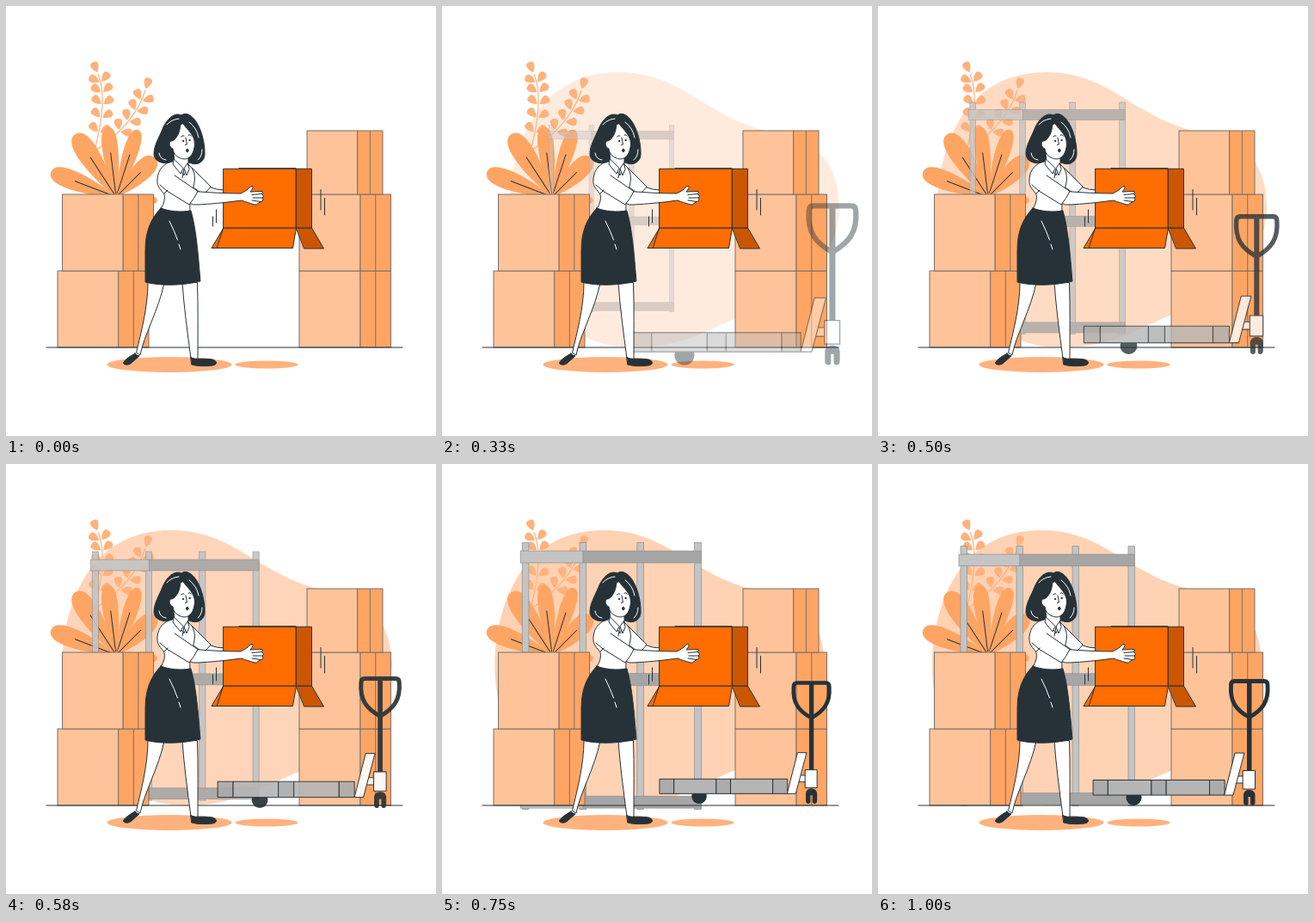
An HTML page for the animation above (1040 ms loop, 500x500 px).

```html
<!DOCTYPE html>
<html lang="en">
<head>
<meta charset="utf-8">
<title>Packing boxes</title>
<style>
  html, body { margin: 0; width: 100%; height: 100%; overflow: hidden; background: #fff; }
  svg { display: block; width: 100vw; height: 100vh; }
  .ink { stroke: #263238; stroke-width: 1; stroke-linecap: round; stroke-linejoin: round; }
  .line { fill: none; }
  .shine { fill: none; stroke: #fff; }
  .white { fill: #fff; }
  .dark { fill: #263238; }
  .carton { stroke: #77706c; stroke-width: 1; }
  .frame { stroke: #8f8f8f; stroke-width: .7; }
</style>
</head>
<body>
<svg viewBox="0 0 500 500">
  <path id="blob" fill="#ffd2b3" d="M63 235C63 180 85 77 190 77C262 77 288 126 360 145C425 152 446 190 446 232C446 300 390 338 340 357C294 375 270 397 205 397C130 397 63 330 63 235Z"/>

  <g id="sprigs" fill="#ffb27d"></g>
  <g id="leaves" fill="#ffa564"></g>
  <g id="shelf" class="frame"></g>
  <g id="cartons" class="carton"></g>

  <path class="ink" d="M47 397H461"/>
  <g fill="#ffb27d">
    <ellipse cx="190" cy="417" rx="72.5" ry="9"/>
    <ellipse cx="303" cy="417" rx="36.5" ry="4.5"/>
  </g>

  <g id="jack">
    <circle class="dark" cx="297.5" cy="388" r="9"/>
    <g id="deck" class="ink"></g>
    <path class="ink white" d="M416 363H426V371H413Z"/>
    <path class="ink white" d="M403 385H413L426 336H415.5Z"/>
    <path class="dark" d="M429 252H434.500V358H429Z"/>
    <path fill="none" stroke="#263238" stroke-width="4.8" d="M414.500 252.500H449Q453 252.500 453 257C454.500 276 447 286 431.700 294.500C416 286 409 276 410.500 257Q410.500 252.500 414.500 252.500Z"/>
    <path class="dark" d="M425 384Q426 379 431.700 379Q437.500 379 438.500 384V394Q438 397 435.500 397Q433 397 433 394V387H430.500V394Q430.500 397 428 397Q425.500 397 425 394Z"/>
    <rect class="ink white" x="424.5" y="356.500" width="14" height="21.5"/>
  </g>

  <g id="legs" class="ink">
    <path class="white" d="M165 322C165 350 157 380 151.500 403L156 406C160 384 178 352 184 322Z"/>
    <path class="white" d="M205 322C207 350 211 380 215 410L223 411C223 380 223.500 350 222.500 322Z"/>
    <path class="dark" d="M150 404Q153 407 155 407L147 414C144 418 137 418 136.500 415C138 411 145 407 150 404Z"/>
    <path class="dark" d="M215 408.500C220 412 228 409 240 411C246 413 246 417 240 418C232 419 222 419 216 417Z"/>
  </g>

  <g id="far-arm" class="ink white">
    <path d="M223 199L238 211Q245 214 255 214V219L224 218Z"/>
    <path d="M208 186Q216 186 220 192L238 210Q235 215 229 219L214 208Z"/>
  </g>

  <g id="body" class="ink">
    <path class="white" d="M193 180C183 184 177 190 176 201C175 211 181 214 184 219Q186 226 180 236C190 241 205 241 214 238C213 226 217 216 219 205C221 194 216 186 210 183Z"/>
    <path class="dark" d="M180 235C168 248 162 262 162 285V321C180 326 206 325 226 320C224 298 222 262 215 238C203 240 190 239 180 235Z"/>
    <path class="shine" d="M190 250Q196 262 199.500 272M201 277L203 283"/>
  </g>

  <g id="head" class="ink">
    <path class="dark" d="M204 127C196 123 187 131 182 143C178 153 172 162 172 172C172 181 184 186 195 180L213 182C224 187 232 180 231 170C231 160 228 146 222 136C218 129 210 122 204 127Z"/>
    <path class="white" d="M195 166L195.500 180L207 197L212 185L212 174Z"/>
    <path class="white" d="M203 138C202 148 198 155 193 157C189 156 189 164 194 166C195 173 200 177 207 178C215 178 219 170 219.500 160C219 150 212 145 206 137Z"/>
    <path class="white" d="M195 178L194 184L203 195L206 189ZM211 183L207 189L210 197L213 190Z"/>
    <path class="line" d="M207 190L205 200M209 153L210.500 161L208.500 161.500M203.500 152Q205 150 207 151M212 150Q214 149 215.500 151"/>
    <circle class="dark" cx="206" cy="157" r=".7"/>
    <circle class="dark" cx="213.500" cy="156" r=".7"/>
    <ellipse class="dark" cx="210.800" cy="168" rx="1.200" ry="1.800"/>
    <path class="shine" d="M187 138Q192 132 201 131M213 135Q222 142 224 153M178 171Q179 178 186 179M228 167Q228 175 223 179"/>
  </g>

  <g id="parcel" class="ink" fill="#ff6c00">
    <path d="M253 258L239 281.500H247Z"/>
    <path fill="#cc5600" d="M337.500 258H355.500L369.500 282H347Z"/>
    <path d="M253 258H337.500L333.500 281.500H245.500Z"/>
    <path d="M253 189.300H337.500V258H253Z"/>
    <path fill="#cc5600" d="M337.500 189.300H355.500V258H337.500Z"/>
    <path d="M271 188.700H337"/>
    <path d="M366 213.500V237M370.500 223.500V243M240.500 245V256M244.500 237V252"/>
  </g>

  <g id="near-arm" class="ink white">
    <path d="M219 215.500Q250 218 273 218Q280 215 285 209.500Q288 209 287 212L284 216L298 215.500Q300 217 297 218.500L299 220Q300.500 222 298 223L299 225Q299 227.500 296 227.500L293 229.500Q292 231.500 289 231C283 229 278 228 274 226Q245 230 223 231Q217 232 213 229Z"/>
    <path class="line" d="M297 218.500L286 219.500M298 223L287 223M296 227.500L286 226"/>
    <path style="stroke:none" d="M179 193L195 196L223 215Q219 224 213 231L186 213L177 205Z"/>
    <path class="line" d="M196 197L223 215.500Q219 224 213 231L187 215L179 208M184 218L188 214"/>
  </g>
</svg>

<script>
const $ = id => document.getElementById(id);
const add = (id, markup) => $(id).insertAdjacentHTML("beforeend", markup);
const rect = (x, y, w, h, fill) =>
  `<rect x="${x}" y="${y}" width="${w}" height="${h}" fill="${fill}"/>`;

// A leaf grows up from 0,0
const leafPath = (len, w) =>
  `M0 0C${-.5 * w} ${-.3 * len} ${-1.1 * w} ${-len} 0 ${-len}C${1.1 * w} ${-len} ${.5 * w} ${-.3 * len} 0 0Z`;

function leaf(angle, len, w) {
  add("leaves", `<g transform="translate(128 222) rotate(${angle})"><path d="${leafPath(len, w)}"/>
    <path class="ink" d="M0 ${-.05 * len}V${-.63 * len}"/></g>`);
}

// Pairs of small leaves follow a curved stem, with one at its tip
function sprig([x0, y0], [x1, y1], [x2, y2], pairs) {
  const mix = (a, b, c, t) => a * (1 - t) ** 2 + 2 * b * t * (1 - t) + c * t * t;
  const slope = (a, b, c, t) => (b - a) * (1 - t) + (c - b) * t;
  add("sprigs", `<path fill="none" stroke="#ffb27d" stroke-width="1.2" d="M${x0} ${y0}Q${x1} ${y1} ${x2} ${y2}"/>`);
  for (let k = 0; k <= pairs; k++) {
    const t = 1 - k * .165;
    const turn = Math.atan2(slope(x0, x1, x2, t), -slope(y0, y1, y2, t)) * 180 / Math.PI;
    for (const tilt of k ? [-50, 50] : [0])
      add("sprigs", `<path transform="translate(${mix(x0, x1, x2, t)} ${mix(y0, y1, y2, t)}) rotate(${turn + tilt}) translate(0 -2)" d="${leafPath(13, 7.5)}"/>`);
  }
}

// The side face takes a third of the width, with the tape down its middle
function carton(x, bottom, w, h) {
  const y = bottom - h;
  add("cartons", rect(x, y, w * 2 / 3, h, "#ffc399") + rect(x + w * 2 / 3, y, w / 3, h, "#ffa564") +
    `<path d="M${x + w * 5 / 6} ${y}v${h}"/>`);
}

sprig([103, 168], [119, 108], [107, 79], 5);
sprig([104, 168], [150, 137], [162, 98], 4);

leaf(-69, 81, 18);
leaf(18, 82, 14);
leaf(-7, 82, 15);
leaf(45, 64, 18);
leaf(95, 48, 9);
leaf(-33, 87, 20);

for (let i = 0; i < 4; i++) add("shelf", rect(96 + 65 * i, 95.5, 7.5, 302, "#c4c4c4"));
for (let i = 0; i < 3; i++) {
  const y = 105 + 138.75 * i;
  add("shelf", rect(94, y, 71, 13.5, "#c4c4c4") + rect(165, y, 133.5, 13.5, "#a6a6a6"));
}

carton(60, 397, 106, 89);
carton(65.5, 308, 106, 89);
carton(341, 397, 106.5, 89);
carton(341, 308, 106.5, 89);
carton(350, 219, 88, 74);

for (let i = 0, x = 250.5; i < 5; i++) {
  const plank = i % 2;
  const w = plank ? 50.5 : 17.2;
  add("deck", rect(x, 367.5, w, 17.5, plank ? "#b5b5b5" : "#ababab"));
  x += w;
}

// cubic-bezier(.36, -.01, .5, 1.38): rises past 1 and settles
const cubic = (a, b, s) => 3 * a * s * (1 - s) ** 2 + 3 * b * s * s * (1 - s) + s ** 3;
function ease(x) {
  let low = 0, high = 1;
  for (let i = 0; i < 24; i++) {
    const mid = (low + high) / 2;
    if (cubic(.36, .5, mid) < x) low = mid; else high = mid;
  }
  return cubic(-.01, 1.38, high);
}

function pose(id, transform, opacity) {
  $(id).setAttribute("transform", transform);
  $(id).setAttribute("opacity", Math.max(0, Math.min(1, opacity)));
}
const zoom = (x, y, k) => `translate(${x} ${y}) scale(${k}) translate(${-x} ${-y})`;

const LOOP = 1040, STEPS = 25;

function draw(ms) {
  const step = Math.floor((ms % LOOP + 5) / (LOOP / STEPS));
  // Each step shows the middle of its interval; the first is empty
  const p = step ? ease(Math.min(1, (step + .5) / (STEPS - 1))) : 0;
  pose("blob", `translate(${28 * (1 - p)} 0)`, p);
  pose("shelf", zoom(196.5, 248, .5 + p / 2), p);
  pose("jack", zoom(353, 324, 1.5 - p / 2), p);
}

const start = performance.now();
function tick() {
  draw(performance.now() - start);
  requestAnimationFrame(tick);
}
tick();
</script>
</body>
</html>
```
